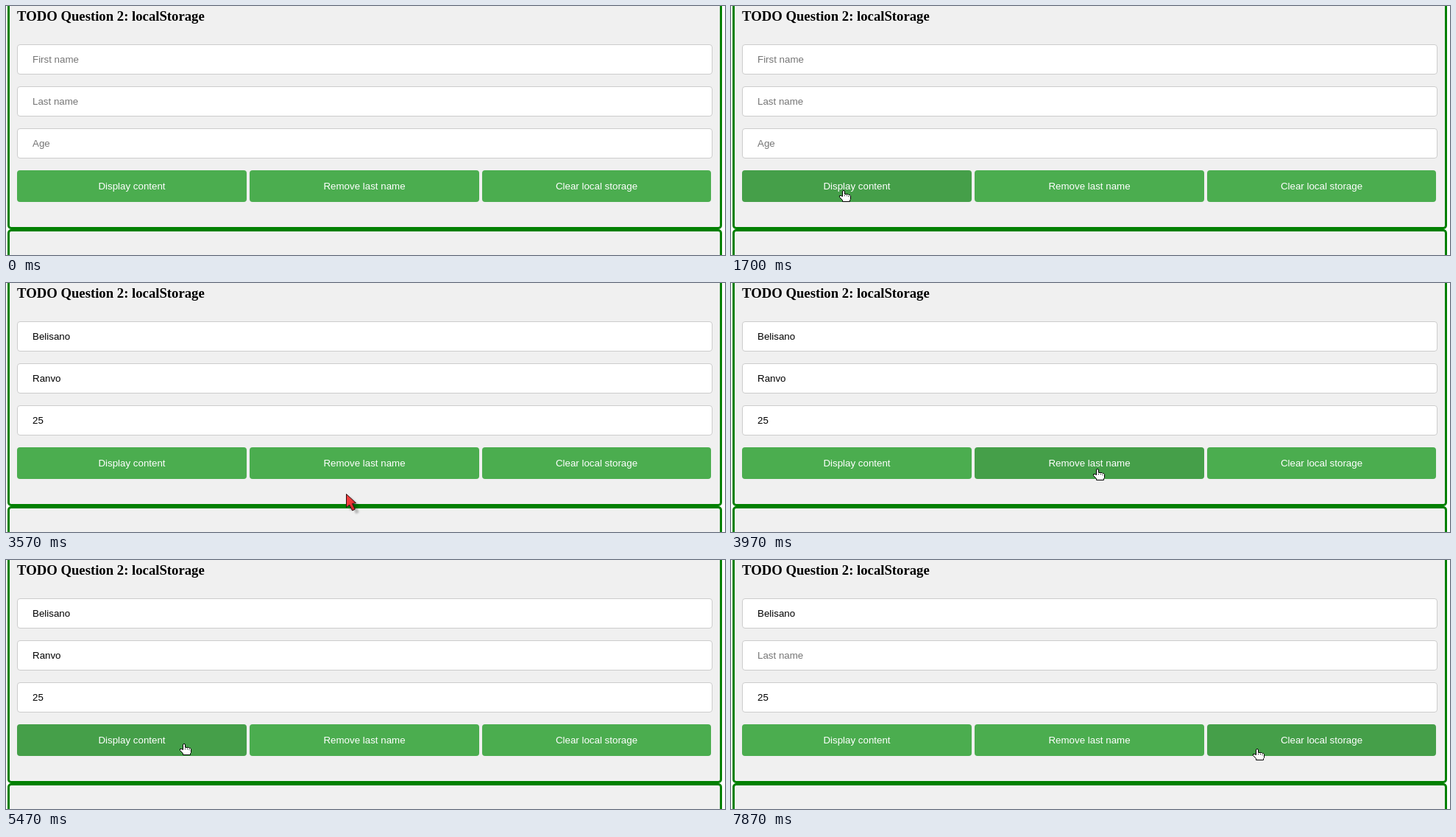
These frames come from a looping animation (977 px wide and 338 px high, 8000 ms). An HTML page:

```html
<!DOCTYPE html>
<html lang="en">
<head>
<meta charset="utf-8">
<title>localStorage form</title>
<style>
  html, body { margin: 0; width: 100%; height: 100%; overflow: hidden; background: #fff; }
  #stage { position: relative; width: 977px; height: 338px; overflow: hidden; }
  #stage > * { position: absolute; box-sizing: border-box; }
  .panel { left: 2px; width: 971px; height: 400px; border: 3px solid green; border-radius: 5px; background: #f0f0f0; }
  h3 { left: 15px; top: 3px; margin: 0; font: bold 18.72px/21px "Liberation Serif", "Times New Roman", serif; white-space: nowrap; }
  .field, .button { border-radius: 4px; font: 13.333px/15px "Liberation Sans", Arial, sans-serif; white-space: nowrap; }
  .field { left: 15px; width: 945px; height: 41px; padding: 12px 20px; border: 1px solid #ccc; background: #fff; color: #000; }
  .field.empty { color: #757575; }
  .button { top: 223px; width: 312px; height: 43px; padding: 14px 20px; background: #4bad4f; color: #fff; text-align: center; }
  .button:last-of-type { width: 311px; }
  .button.hover { background: #459f49; }
  .cursor { left: 0; top: 0; width: 20px; height: 26px; overflow: visible; visibility: hidden; }
  #arrow { filter: drop-shadow(5px 4px 1px rgba(0, 0, 0, .22)); }
</style>
</head>
<body>
<div id="stage">
  <div class="panel" style="top:-97px"></div>
  <div class="panel" style="top:303px"></div>
  <h3>TODO Question 2: localStorage</h3>
  <div class="field" style="top:52px"></div>
  <div class="field" style="top:109px"></div>
  <div class="field" style="top:166px"></div>
  <div class="button" style="left:15px">Display content</div>
  <div class="button" style="left:331px">Remove last name</div>
  <div class="button" style="left:647px">Clear local storage</div>
  <svg class="cursor" id="arrow">
    <linearGradient id="red" x2="1" y2="1">
      <stop offset=".4" stop-color="#f23c3c"/>
      <stop offset="1" stop-color="#c02020"/>
    </linearGradient>
    <path d="M.5 .5V18.5L4.7 15.2 8.6 23 12.3 21.1 8.6 13.6 13.5 12.6Z" fill="url(#red)" stroke="#2a1010" stroke-linejoin="round"/>
  </svg>
  <svg class="cursor" id="hand">
    <g transform="translate(-6)" stroke="#000" stroke-linejoin="round">
      <path d="M4.5 8.5V2Q4.5 .5 6 .5T7.5 2V5.5H12L13 6.5H14.5L15.5 7.5V12.5L14.5 13.5V15.5H4.5V13.5L.5 9.5V7.5H2.5L4.5 8.5" fill="#fff"/>
      <path d="M7.5 7V9M10.5 7V9M13 8V10" stroke-dasharray="1"/>
    </g>
  </svg>
</div>
<script>
  const LOOP = 8000;
  const TICK = 75; // the pointer moves in visible steps
  const LABELS = ["First name", "Last name", "Age"];

  const FORM = [
    { at: 0, values: ["", "", ""] },
    { at: 2170, values: ["Belisano", "Ranvo", "25"] },
    { at: 6330, values: ["Belisano", "", "25"] }
  ];

  // Pointer moves, curved towards `via`; without `to` the pointer is off stage
  const MOVES = [
    { at: 0 },
    { at: 1100, steps: 5, from: [120, 338], via: [135, 290], to: [145, 263] },
    { at: 1600, steps: 2, to: [153, 250] },
    { at: 2870, steps: 1, to: [152, 251] },
    { at: 3070, steps: 11, via: [521, 324], to: [496, 254] },
    { at: 3970, steps: 1, to: [498, 252] },
    { at: 4730, steps: 1, to: [494, 254] },
    { at: 4870, steps: 9, via: [301, 361], to: [242, 249] },
    { at: 6930, steps: 1, to: [242, 260] },
    { at: 6970 },
    { at: 7370, steps: 7, from: [670, 334], via: [690, 275], to: [715, 256] }
  ];

  const fields = [...document.querySelectorAll(".field")];
  const buttons = [...document.querySelectorAll(".button")];
  const arrow = document.getElementById("arrow");
  const hand = document.getElementById("hand");

  const current = (list, t) => list.findLast(item => item.at <= t);

  function pointerAt(t) {
    const move = current(MOVES, t);
    if (!move.to) return null;
    const { at, steps, to } = move;
    const from = move.from || MOVES[MOVES.indexOf(move) - 1].to;
    const u = Math.min(1, (Math.floor((t - at) / TICK) + 1) / steps);
    return to.map((end, i) => {
      const bend = move.via ? move.via[i] : (from[i] + end) / 2;
      return Math.round((1 - u) ** 2 * from[i] + 2 * u * (1 - u) * bend + u * u * end);
    });
  }

  function isOver(button, [x, y]) {
    const dx = x - button.offsetLeft, dy = y - button.offsetTop;
    return dx >= 0 && dx < button.offsetWidth && dy >= 0 && dy < button.offsetHeight;
  }

  function place(cursor, point) {
    cursor.style.visibility = point ? "visible" : "hidden";
    if (point) cursor.style.transform = `translate(${point[0]}px, ${point[1]}px)`;
  }

  function draw() {
    const t = performance.now() % LOOP;
    const { values } = current(FORM, t);
    fields.forEach((field, i) => {
      field.textContent = values[i] || LABELS[i];
      field.classList.toggle("empty", !values[i]);
    });

    const point = pointerAt(t);
    const target = point && buttons.find(button => isOver(button, point));
    buttons.forEach(button => button.classList.toggle("hover", button === target));
    place(hand, target ? point : null);
    place(arrow, target ? null : point);
    requestAnimationFrame(draw);
  }
  draw();
</script>
</body>
</html>
```
